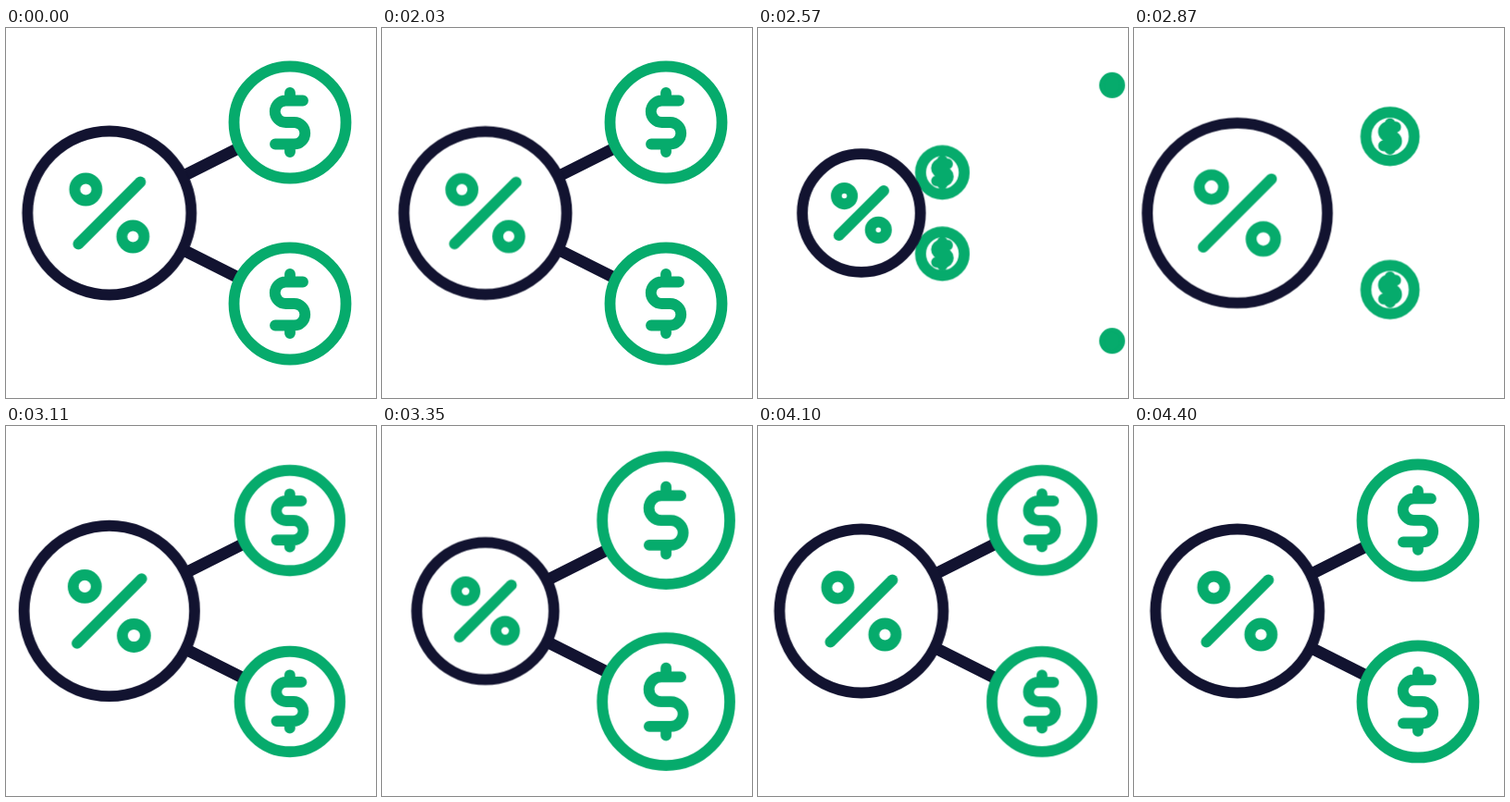
These frames come from a looping animation (400x400 px, 4.43 s). An HTML page without scripts:

```html
<!DOCTYPE html>
<html lang="en">
<head>
<meta charset="utf-8">
<title>Percent to dollars</title>
<style>
  html, body { margin: 0; width: 100%; height: 100%; overflow: hidden; background: #fff; }
  svg { display: block; width: 100%; height: 100%; }

  .shape, .shape * {
    fill: none;
    stroke-width: 11.8;
    stroke-linecap: round;
    stroke-linejoin: round;
    vector-effect: non-scaling-stroke;
  }
  .shape .disc { fill: #fff; }
  .green { stroke: #06ab6c; }
  .dark { stroke: #121330; }

  .up { --y: -98px; }
  .down { --y: 98px; }

  .hub, .link, .move, .size {
    animation: 4430ms cubic-bezier(.333, 0, .667, 1) infinite;
  }
  .hub { animation-name: pulse; }
  .link { animation-name: draw; stroke-width: 12.6; stroke-dasharray: 1 2; }
  .leaving .move { animation-name: leave; }
  .leaving .size { animation-name: shrink; }
  .arriving .move { animation-name: arrive; }
  .arriving .size { animation-name: grow; }

  @keyframes pulse {
    0%, 44.9% { transform: scale(1); }
    56.7% { transform: scale(.7); }
    66.8% { transform: scale(1.145); }
    75.6% { transform: scale(.838); }
    92.3%, 100% { transform: scale(1); }
  }
  @keyframes draw {
    0%, 45.8% { stroke-dashoffset: 0; }
    54.2%, 65.4% { stroke-dashoffset: -1; }
    65.41% { stroke-dashoffset: 1; }
    72.5%, 100% { stroke-dashoffset: 0; }
  }
  @keyframes leave {
    0%, 46.07% { transform: translate(195.3px, var(--y)); }
    71.5%, 100% { transform: translate(361.5px, calc(var(--y) * 1.9)); }
  }
  @keyframes shrink {
    0%, 45.8% { transform: scale(1); }
    61.5%, 100% { transform: scale(.01); }
  }
  @keyframes arrive {
    0%, 47% { transform: translate(0, 0); }
    70.7%, 100% { transform: translate(195.3px, var(--y)); }
  }
  @keyframes grow {
    0% { transform: scale(.39); }
    62.6% { transform: scale(.39); animation-timing-function: cubic-bezier(.4, 0, .4, 1); }
    77.4% { transform: scale(1.15); }
    86.9% { transform: scale(.82); }
    99.8%, 100% { transform: scale(1); }
  }
</style>
</head>
<body>
<svg viewBox="0 0 400 400">
  <defs>
    <g id="coin" class="shape green">
      <circle class="disc" r="60.5"/>
      <path d="M14-23.5H-4.5a11.75 11.75 0 0 0 0 23.5H4.5a11.75 11.75 0 0 1 0 23.5H-16M0-32V-23.5M0 23.5V32"/>
    </g>
  </defs>

  <g transform="translate(111.7 200)">
    <line class="link dark" pathLength="1" x1="70" y1="-35" x2="195.3" y2="-98"/>
    <line class="link dark" pathLength="1" x1="70" y1="35" x2="195.3" y2="98"/>

    <g class="leaving">
      <g class="move up"><g class="size"><use href="#coin"/></g></g>
      <g class="move down"><g class="size"><use href="#coin"/></g></g>
    </g>
    <g class="arriving">
      <g class="move up"><g class="size"><use href="#coin"/></g></g>
      <g class="move down"><g class="size"><use href="#coin"/></g></g>
    </g>

    <g class="hub shape">
      <circle class="disc dark" r="88.5"/>
      <g class="green">
        <circle cx="-25.5" cy="-25.5" r="12"/>
        <circle cx="25.5" cy="25.5" r="12"/>
        <path d="M-33.5 33.5L33.5-33.5"/>
      </g>
    </g>
  </g>
</svg>
</body>
</html>
```
